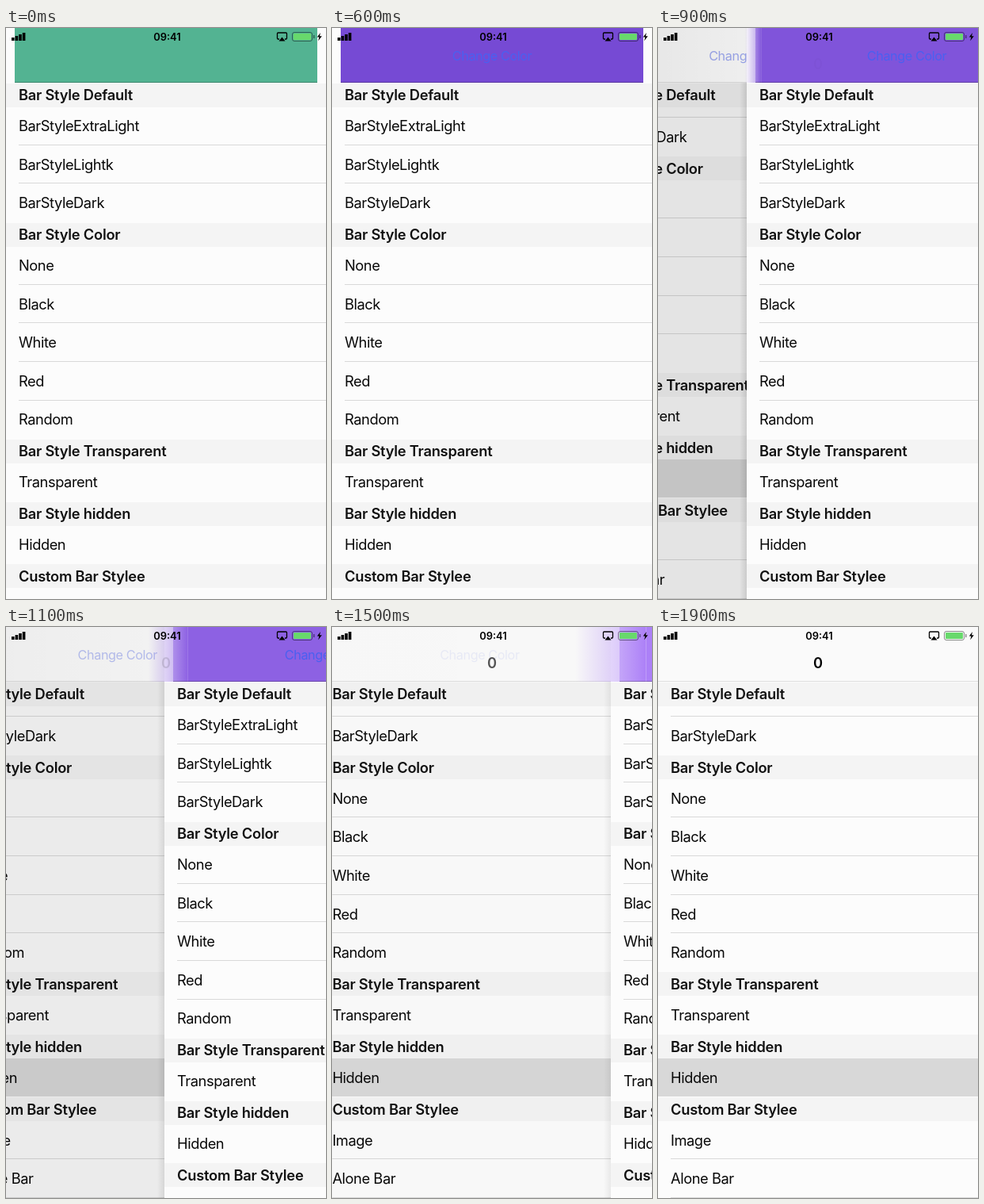
An HTML page with a canvas that plays this animation: 404x720 px, repeating every 2 s.

```html
<!DOCTYPE html>
<html lang="en">
<head>
<meta charset="utf-8">
<title>Navigation bar transition</title>
<style>
  html, body { margin: 0; width: 100%; height: 100%; overflow: hidden; background: #fcfcfc; }
  canvas { display: block; }
</style>
</head>
<body>
<canvas id="stage" width="404" height="720"></canvas>
<script>
const ctx = document.getElementById('stage').getContext('2d');
const W = 404, H = 720, LOOP = 2000, STEP = 100;
const NAV = 69, HEADER = 30.2, ROW = 48.6, LIST_TOP = 69.5, SCROLL = 83.3;
const GREEN = [83, 179, 146], PURPLE = [118, 74, 212], LAVENDER = [184, 140, 255];

const sections = [
  ['Bar Style Default', 'BarStyleExtraLight', 'BarStyleLightk', 'BarStyleDark'],
  ['Bar Style Color', 'None', 'Black', 'White', 'Red', 'Random'],
  ['Bar Style Transparent', 'Transparent'],
  ['Bar Style hidden', 'Hidden'],
  ['Custom Bar Stylee', 'Image', 'Alone Bar', '']
];

// Left edge of the upper page: [time, x]
const slide = [[600, 0], [900, 112], [1100, 200], [1300, 300], [1500, 352],
               [1600, 374], [1700, 392], [1800, W]];

const mix = (a, b, k) => a.map((v, i) => Math.round(v + (b[i] - v) * k));
const rgba = (c, alpha = 1) => `rgba(${c.join(',')},${alpha})`;

function slideX(t) {
  if (t <= slide[0][0]) return 0;
  const i = slide.findIndex(key => key[0] >= t);
  if (i < 0) return W;
  const [t0, x0] = slide[i - 1], [t1, x1] = slide[i];
  return x0 + (x1 - x0) * (t - t0) / (t1 - t0);
}

function box(x, y, w, h, fill) {
  ctx.fillStyle = fill;
  ctx.fillRect(x, y, w, h);
}

function text(str, x, y, size, weight, color, spacing = 0, align = 'left') {
  ctx.font = `${weight} ${size}px Inter, sans-serif`;
  ctx.letterSpacing = spacing + 'px';
  ctx.textAlign = align;
  ctx.fillStyle = color;
  ctx.fillText(str, x, Math.round(y));
}

function shade(x0, x1, top, bottom, from, to) {
  const g = ctx.createLinearGradient(x0, 0, x1, 0);
  g.addColorStop(0, from);
  g.addColorStop(1, to);
  box(x0, top, x1 - x0, bottom - top, g);
}

function header(title, x, y) {
  box(x, Math.round(y), W, 30, '#f4f4f4');
  text(title, x + 16, y + 21.6, 18.3, 600, '#111', -0.24);
}

function list(x, scroll, selected) {
  let y = LIST_TOP - scroll;
  for (const [title, ...rows] of sections) {
    header(title, x, y);
    y += HEADER;
    rows.forEach((label, i) => {
      if (label && label === selected) box(x, Math.round(y), W, 48, '#d8d8d8');
      text(label, x + 16, y + 30.3, 18.3, 400, '#080808', -0.44);
      y += ROW;
      if (i < rows.length - 1) box(x + 16, Math.floor(y) - 1, W - 16, 1, '#d9d9d9');
    });
  }
  if (scroll) {
    box(x, 0, W, LIST_TOP, '#fafafa');
    header(sections[0][0], x, LIST_TOP);
  }
}

function changeColor(x, color) {
  text('Change Color', x + 202, 40.5, 16.2, 400, color, -0.4, 'center');
}

// The bar's left edge blurs outwards and inwards by the glow width.
function colorBar(x, color, glow) {
  const edge = x + 11, inner = glow * 0.6;
  if (glow) {
    shade(edge - glow, edge, 0, NAV, rgba(color, 0), rgba(color, 0.4));
    shade(edge, edge + inner, 0, NAV, rgba(color, 0.7), rgba(color));
  }
  box(edge + inner, 0, 382 - inner, NAV, rgba(color));
  box(edge, 68, 382, 1, 'rgba(0,0,0,.25)');
}

function statusBar() {
  for (let i = 0; i < 4; i++) {
    const h = 4 + i * 2;
    box(7 + i * 4.6, 16 - h, 3.6, h, '#000');
  }
  text('09:41', 203.5, 15.6, 12.9, 600, '#000', 0, 'center');

  ctx.strokeStyle = '#000';
  ctx.lineWidth = 1.3;
  ctx.stroke(new Path2D('M345 14h-1.5q-1 0-1-1v-6q0-1 1-1h10q1 0 1 1v6q0 1-1 1h-1.5'));
  ctx.fillStyle = '#000';
  ctx.fill(new Path2D('M348.5 11.5l4 5h-8z'));

  ctx.strokeStyle = 'rgba(0,0,0,.45)';
  ctx.lineWidth = 1;
  ctx.beginPath();
  ctx.roundRect(361.5, 5.5, 25, 11, 2.5);
  ctx.stroke();
  box(388, 9, 1.5, 4, 'rgba(0,0,0,.45)');
  ctx.fillStyle = '#68d96c';
  ctx.beginPath();
  ctx.roundRect(363, 7, 22, 8, 1);
  ctx.fill();
  ctx.fillStyle = '#000';
  ctx.fill(new Path2D('M397 6l-4.2 5.6h2.6l-1.2 4.6 4.6-6h-2.8z'));
}

function draw(t) {
  const x = slideX(t), p = x / W;
  const intro = Math.min(t / 600, 1);
  box(0, 0, W, H, '#fcfcfc');

  // Lower page, with parallax and dimming
  if (p > 0) {
    const under = (x - W) * 0.3, dim = 0.13 * (1 - p);
    list(under, SCROLL, 'Hidden');
    box(0, 0, W, NAV, '#fafafa');
    box(0, 68, W, 1, '#dedede');
    changeColor(under, rgba([90, 110, 230], 0.8 * (1 - p)));
    shade(0, x, 0, NAV, `rgba(0,0,0,${dim * 0.8})`, `rgba(0,0,0,${dim * 0.5})`);
    box(0, NAV, x, H, `rgba(0,0,0,${dim})`);
    if (p < 1) shade(x - 9, x, NAV, H, 'rgba(0,0,0,0)', `rgba(0,0,0,${0.13 * (1 - p * 0.6)})`);
  }

  // Upper page and its coloured bar
  if (p < 1) {
    box(x, 0, W, H, '#fcfcfc');
    list(x, 0);
    box(x, 0, W, NAV, '#fcfcfc');
    const color = mix(mix(GREEN, PURPLE, intro), LAVENDER, p ** 1.5);
    colorBar(x, color, Math.min(56, 90 * p ** 1.5));
    changeColor(x, rgba([74, 96, 240], intro));
  }

  text('0', 202, 51.8, 18.3, 600, `rgba(0,0,0,${p ** 3})`, 0, 'center');
  statusBar();
}

function frame() {
  const t = performance.now() % LOOP;
  draw(Math.floor(t / STEP) * STEP);
  requestAnimationFrame(frame);
}
frame();
</script>
</body>
</html>
```
